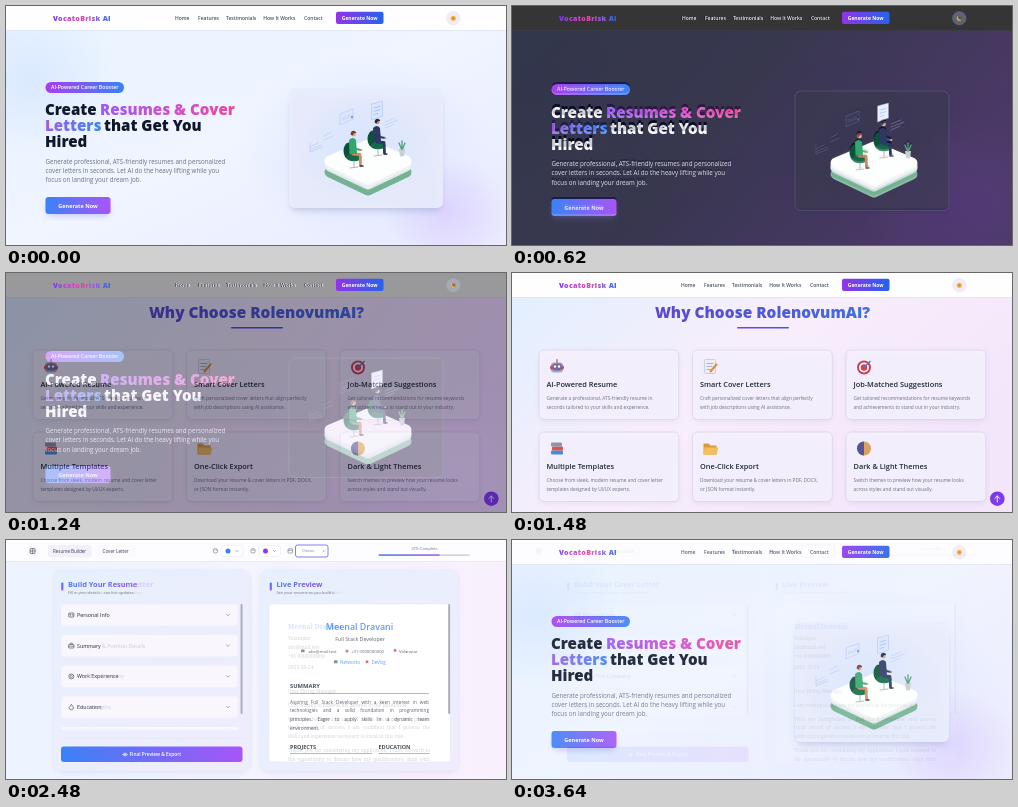
Write an HTML page that moves like this. It is 500x239 px and loops after 3.7 s.

```html
<!DOCTYPE html>
<html lang="en">
<head>
<meta charset="utf-8">
<title>Resume builder tour</title>
<style>
  html, body { margin: 0; width: 100%; height: 100%; overflow: hidden; background: #fff; }
  svg { display: block; width: 100%; height: 100%; }
  text, .just { font-family: 'Open Sans', 'Noto Sans', sans-serif; white-space: pre; }
  .serif { font-family: 'Noto Serif', serif; }
  .just { text-align: justify; text-align-last: justify; white-space: nowrap; line-height: 8.5px; }
</style>
</head>
<body>
<svg id="stage" viewBox="0 0 500 239" preserveAspectRatio="none"></svg>
<script>
const HOLD = 200, STEP = 60, STEPS = 10, SEGMENT = HOLD + STEP * (STEPS - 1);
const BRAND = 'VocatoBrisk AI', PERSON = 'Meenal Dravani', CITY = 'Velanipur',
      EMAIL = 'abc@mail.test', PHONE = '+91 0000000000';

// Drawing helpers
const text = (x, y, size, str, fill, weight = 400, extra = '') =>
  `<text x="${x}" y="${y}" font-size="${size}" fill="${fill}" font-weight="${weight}" ${extra}>${str}</text>`;
const mid = 'text-anchor="middle"';
const rect = (x, y, w, h, r, fill, extra = '') =>
  `<rect x="${x}" y="${y}" width="${w}" height="${h}" rx="${r}" fill="${fill}" ${extra}/>`;
const circle = (x, y, r, fill, extra = '') => `<circle cx="${x}" cy="${y}" r="${r}" fill="${fill}" ${extra}/>`;
const ellipse = (x, y, rx, ry, fill) => `<ellipse cx="${x}" cy="${y}" rx="${rx}" ry="${ry}" fill="${fill}"/>`;
const path = (d, fill, extra = '') => `<path d="${d}" fill="${fill}" ${extra}/>`;
const line = (d, stroke, width = 0.7, extra = '') =>
  path(d, 'none', `stroke="${stroke}" stroke-width="${width}" stroke-linecap="round" stroke-linejoin="round" ${extra}`);
const chevron = (x, y, s = 1.5) => line(`M${x - s} ${y - s / 2}l${s} ${s}l${s} ${-s}`, '#6b7280', 0.6);
const justified = (x, cy, w, size, str, fill, cls = '') =>
  `<foreignObject x="${x}" y="${cy - 4.25}" width="${w}" height="9"><div class="just ${cls}" style="font-size:${size}px;color:${fill}">${str}</div></foreignObject>`;

const linear = (id, colors, x2 = 1, y2 = 0) =>
  `<linearGradient id="${id}" x1="0" y1="0" x2="${x2}" y2="${y2}">${colors.map((c, i) =>
    `<stop offset="${i / (colors.length - 1)}" stop-color="${c}"/>`).join('')}</linearGradient>`;
const glow = (id, color, opacity) =>
  `<radialGradient id="${id}"><stop stop-color="${color}" stop-opacity="${opacity}"/><stop offset=".55" stop-color="${color}" stop-opacity="${opacity * .5}"/><stop offset="1" stop-color="${color}" stop-opacity="0"/></radialGradient>`;

const defs = `<defs>
  ${linear('logo', ['#7c3aed', '#c044d8', '#e0489c', '#8a63e0', '#2563eb'])}
  ${linear('violetBlue', ['#9333ea', '#2563eb'])}
  ${linear('badge', ['#a73ff0', '#3b82f6'])}
  ${linear('blueViolet', ['#3b82f6', '#a855f7'])}
  ${linear('barFill', ['#3b82f6', '#a855f7'], 0, 1)}
  ${linear('title', ['#4f7df3', '#8b4fe6'])}
  ${linear('words1', ['#9a5cf6', '#cf4fd0', '#ec4899'])}
  ${linear('words2', ['#9a5fe0', '#3b86f6'])}
  ${linear('why', ['#5b48d0', '#4f58d8', '#3f70e2'])}
  ${linear('heroLight', ['#e8f3ff', '#f0f5ff', '#e9eaff'], 1, 1)}
  ${linear('heroDark', ['#070a1e', '#0a0823', '#220b40'], 1, .4)}
  ${linear('features', ['#e0efff', '#f8eefb', '#f3e6fb'], 1, .5)}
  ${linear('page', ['#edf4ff', '#f3f4fe', '#faf0fd'])}
  ${linear('panel', ['#e7f0fe', '#efecfd'], 1, 1)}
  ${glow('violetGlow', '#cfbcfd', .5)}${glow('blueGlow', '#cbdfff', .5)}${glow('darkGlow', '#4d2580', .3)}
  <filter id="soft" x="-20%" y="-20%" width="140%" height="150%"><feGaussianBlur stdDeviation="3"/></filter>
  <clipPath id="sheet"><rect x="263" y="64" width="181" height="158"/></clipPath>
</defs>`;

function navBar(dark) {
  const links = [['Home', 169], ['Features', 192], ['Testimonials', 220], ['How It Works', 257.3], ['Contact', 298]];
  const shift = dark ? .9 : 0;
  return rect(0, 0, 500, 24, 0, dark ? '#030305' : '#fefeff') + rect(0, 24, 500, .7, 0, dark ? '#15151d' : '#dbe2ec') +
    text(47, 15, 7.1, BRAND, 'url(#logo)', 800, 'letter-spacing=".3"') +
    links.map(([s, x]) => text(x + shift, 14.3, 5, s, dark ? '#fff' : '#4b5563', 600)).join('') +
    rect(330, 5.7, 47.5, 12.4, 2, 'url(#violetBlue)') + text(353.7, 13.9, 5, 'Generate Now', '#fff', 700, mid) +
    circle(447.3, 12.2, 6.8, dark ? '#3a4356' : '#f1ecf7', `stroke="${dark ? '#4b5568' : '#e4ddec'}" stroke-width=".4"`) +
    (dark ? path('M446.4 9.7a2.6 2.6 0 1 0 3.2 3.7a2.5 2.5 0 0 1-3.2-3.7', '#f0b74a')
          : circle(447.3, 12.3, 2.6, '#f3bd45') + circle(447.3, 12.3, 1.4, '#d98a2b'));
}

const diamond = (dy, fill) =>
  path(`M324 ${155 + dy}L362 ${139 + dy}L400 ${155 + dy}L362 ${173 + dy}Z`, fill, `stroke="${fill}" stroke-width="11" stroke-linejoin="round"`);

function seated(x, y, top, legs, hair) {
  return ellipse(x - 4, y + 17, 5.5, 8.5, '#0c5139') + ellipse(x + 1, y + 23.5, 7.5, 3.8, '#126a48') +
    line(`M${x + 1} ${y + 27}v6m-4 1l8 -1`, '#9aa7a6', .8) +
    line(`M${x} ${y + 20}L${x + 7} ${y + 20.5}L${x + 7.5} ${y + 31}`, legs, 2.8) +
    line(`M${x + 7} ${y + 32}h3`, '#27304a', 1.4) +
    path(`M${x - 4} ${y + 6}q4 -4 7 0l1 14h-7.5z`, top) +
    line(`M${x + 1} ${y + 9}l2 6l5 1`, top, 1.8) + circle(x + 8.3, y + 16, 1.1, '#e9a07a') +
    circle(x + .5, y, 2.4, '#e9a07a') + path(`M${x - 2.3} ${y + .8}q-.3 -4 3 -4q2.4 .3 2.5 2.2q-3 -.4 -3.5 2.4z`, hair);
}

function illustration(dark) {
  const faint = dark ? '#8f98c4' : '#a9bdf2';
  const hologram = path('M334 108l13 -5v10l-13 6z', dark ? '#1d1c40' : '#dce8ff', `stroke="${faint}" stroke-width=".6"`) +
    line('M336.5 112l3 -1.2m2 -.8l3 -1.2m-8 5l7 -2.8M304 141l8 -4m-8 7l11 -5m3 -9l7 -4m-7 8l9 -4M304 137v9l12 -5', faint, .6) +
    circle(346, 111, 1.2, '#5b8def');
  return diamond(11, '#74b292') + diamond(5, '#dfe8ec') + diamond(3, '#edf2f5') + diamond(0, '#fdfefe') +
    `<g opacity="${dark ? .35 : .8}">${hologram}</g>` +
    path('M365.5 98l11 -3v15l-11 4z', dark ? '#f0f4ff' : '#d9e6ff', `stroke="${faint}" stroke-width=".5"`) +
    line('M368 102l6 -1.7m-6 5l6 -1.7m-6 5l4 -1.2', '#8da8e8', .6) +
    line('M379 116l10 -4m-10 7l13 -5m-13 8l9 -4', faint, .6, 'opacity=".75"') +
    seated(371, 116, '#2c3a63', '#2b3a62', '#27293e') + seated(347, 128, '#35a56f', '#d58a63', '#7a3d2c') +
    path('M393 143h6l-1 7q-2 1 -4 0z', '#c7d0d5') +
    line('M396 143v-8m-.5 8l-2.5 -6m3.5 6l2.5 -6', '#4f9e76', 1.3);
}

function hero(dark) {
  const ink = dark ? '#fff' : '#0f172a', soft = dark ? '#e2e4ea' : '#6b7280';
  const copy = ['Generate professional, ATS-friendly resumes and personalized',
    'cover letters in seconds. Let AI do the heavy lifting while you', 'focus on landing your dream job.'];
  const back = rect(0, 0, 500, 239, 0, dark ? 'url(#heroDark)' : 'url(#heroLight)') +
    (dark ? ellipse(455, 200, 110, 90, 'url(#darkGlow)')
          : ellipse(25, 75, 85, 75, 'url(#blueGlow)') + ellipse(360, 145, 130, 100, 'url(#blueGlow)') + ellipse(440, 205, 62, 55, 'url(#violetGlow)'));
  const card = dark
    ? rect(283, 83, 154, 119.5, 6, '#0f0e24', 'fill-opacity=".6" stroke="#3f3d5c" stroke-width=".6"')
    : rect(285, 90, 150, 115, 6, '#8a93ba', 'opacity=".4" filter="url(#soft)"') + rect(283, 82, 154, 120, 6, '#e9edfd', 'fill-opacity=".93"') +
      ellipse(358, 140, 70, 55, 'url(#blueGlow)');
  const words = text(39, 109, 15.1, 'Create', ink, 800) + text(94, 109, 15.1, 'Resumes &amp; Cover', 'url(#words1)', 800) +
    text(39, 125, 15.1, 'Letters', 'url(#words2)', 800) + text(98, 125, 15.1, 'that Get You', ink, 800) +
    text(39, 141, 15.1, 'Hired', ink, 800) +
    copy.map((s, i) => text(39.5, 157.7 + 9.1 * i, 6.22, s, soft, dark ? 500 : 400)).join('');
  return back + `<g transform="translate(0 ${dark ? 2 : 0})">` +
    rect(39.5, 76, 78.5, 11, 5.5, 'url(#badge)') + text(78.7, 83.4, 5.2, 'AI-Powered Career Booster', '#fff', 600, mid) +
    `<g transform="translate(0 ${dark ? .7 : 0})">${words}</g>` +
    rect(41, 195, 62, 15, 4, '#7b6fe0', 'opacity=".35" filter="url(#soft)"') +
    rect(39.5, 191, 65, 17, 3, 'url(#blueViolet)') + text(72, 201.6, 5.5, 'Generate Now', '#fff', 700, mid) +
    card + illustration(dark) + '</g>' + navBar(dark);
}

const featureIcons = [
  (x, y) => rect(x - 6, y - 4, 12, 10, 3, '#a9a6c4') + rect(x - 7, y - 1, 14, 4, 1.5, '#d9485f') + rect(x - 4.5, y - 3, 9, 7, 2, '#6b6ca2') +
    circle(x - 2, y, 1.2, '#fff') + circle(x + 2, y, 1.2, '#fff') + line(`M${x} ${y - 4}v-3`, '#d9485f', 1.2),
  (x, y) => rect(x - 6, y - 7, 11, 14, 1, '#eceef4', 'stroke="#b7bccb" stroke-width=".6"') +
    line(`M${x - 3.5} ${y - 3}h6m-6 3h5m-5 3h4`, '#8d97ad', .7) + line(`M${x + 6} ${y - 2}l-6 7`, '#e38b3c', 2),
  (x, y) => circle(x, y + 1, 7, '#d53d54') + circle(x, y + 1, 5, '#fff') + circle(x, y + 1, 3.2, '#d53d54') + line(`M${x} ${y + 1}l6 -6`, '#3f7fd1', 1.5),
  (x, y) => rect(x - 6, y + 2, 12, 4, 1, '#3f8fd8') + rect(x - 5, y - 2, 11, 4, 1, '#d9534f') + rect(x - 6, y - 6, 11, 4, 1, '#8f93a8'),
  (x, y) => path(`M${x - 7} ${y - 5}h5l2 2h6v9h-13z`, '#d99a3a') + path(`M${x - 6} ${y - 1}h14l-2 7h-13z`, '#f3c057'),
  (x, y) => circle(x, y, 7, '#d9a062') + path(`M${x} ${y - 7}a7 7 0 0 0 0 14z`, '#55549a')
];
const features = [
  ['AI-Powered Resume', 'Generate a professional, ATS-friendly resume in', 'seconds tailored to your skills and experience.'],
  ['Smart Cover Letters', 'Craft personalized cover letters that align perfectly', 'with job descriptions using AI assistance.'],
  ['Job-Matched Suggestions', 'Get tailored recommendations for resume keywords', 'and achievements to stand out in your industry.'],
  ['Multiple Templates', 'Choose from sleek, modern resume and cover letter', 'templates designed by UI/UX experts.'],
  ['One-Click Export', 'Download your resume &amp; cover letters in PDF, DOCX,', 'or JSON format instantly.'],
  ['Dark &amp; Light Themes', 'Switch themes to preview how your resume looks', 'across styles and stand out visually.']
];

function featurePage() {
  const cards = features.map(([head, a, b], i) => {
    const x = 27 + 153.5 * (i % 3), y = i < 3 ? 77 : 159;
    return rect(x + 1, y + 3, 138, 68, 5, '#9c94bb', 'opacity=".2" filter="url(#soft)"') +
      rect(x, y, 139.8, 69.5, 5, '#f5f1fd', 'fill-opacity=".9" stroke="#d5cfe6" stroke-width=".6"') + featureIcons[i](x + 18, y + 16.5) +
      text(x + 7.5, y + 37.3, 7.35, head, '#1f2937', 600) +
      text(x + 7.5, y + 50, 4.8, a, '#6b7280') + text(x + 7.5, y + 59.4, 4.8, b, '#6b7280');
  }).join('');
  return rect(0, 0, 500, 239, 0, 'url(#features)') + navBar(false) +
    text(250.5, 45, 15.4, 'Why Choose RolenovumAI?', 'url(#why)', 800, mid) +
    rect(225, 54, 52, 1.5, .7, 'url(#violetBlue)') + cards +
    circle(485.3, 225.7, 7.3, '#7c3aed') + line('M485.3 229v-6m-2.5 2.5l2.5 -2.5l2.5 2.5', '#fff', .9);
}

function toolBar(active, percent) {
  const palette = x => circle(x, 10.8, 2.3, 'none', 'stroke="#6b7280" stroke-width=".6"') + circle(x - .7, 10, .5, '#6b7280') + circle(x + .8, 10.2, .5, '#6b7280');
  const swatch = (x, color) => rect(x, 5.5, 22, 11, 3, '#fff', 'stroke="#e3e5ee" stroke-width=".5"') + circle(x + 7, 11, 2.5, color) + chevron(x + 16, 11, 1.2);
  return rect(0, 0, 500, 21, 0, '#fdfdff') + rect(0, 21, 500, .6, 0, '#e3e7f0') +
    rect(21.5, 5.5, 10.5, 11, 2, '#f7f7fb') + rect(24.2, 8.6, 4.8, 4.8, .6, 'none', 'stroke="#4b5563" stroke-width=".7"') +
    line('M26.6 8.6v4.8m-2.4 -2.4h4.8', '#4b5563', .6) +
    (active ? rect(91, 5, 39, 12.5, 3, '#f1edfa') : rect(42, 5, 43.5, 12.5, 3, '#f1edfa')) +
    text(47, 12.6, 4.5, 'Resume Builder', '#374151', 500) + text(96.5, 12.6, 4.6, 'Cover Letter', '#374151', 500) +
    palette(209.5) + swatch(215, '#3b82f6') + palette(247) + swatch(252.5, '#9333ea') +
    rect(282, 8.8, 4.6, 4.2, .6, 'none', 'stroke="#6b7280" stroke-width=".6"') + rect(282, 9.9, 4.6, .6, 0, '#6b7280') +
    rect(289.5, 5, 32.5, 12, 2, '#fff', 'stroke="#7470e8" stroke-width=".9"') + text(296, 12.3, 4, 'Classic', '#6f86a8') + chevron(318, 11, 1.1) +
    text(418.5, 10.3, 3.9, `${percent}% Complete`, '#6b7280', 400, mid) +
    rect(372.5, 14.2, 91.5, 1.7, .8, '#d4d6df') + (percent ? rect(372.5, 14.2, .915 * percent, 1.7, .8, 'url(#blueViolet)') : '');
}

const sectionIcons = [
  (x, y) => rect(x - 2.6, y - 2, 5.2, 4, .5, 'none', 'stroke="#4b5563" stroke-width=".7"') + circle(x - 1, y - .3, .7, '#4b5563') + line(`M${x + .8} ${y - .6}h1m-1 1.2h1`, '#4b5563', .5),
  (x, y) => rect(x - 2.6, y - 1.3, 5.2, 3.6, .5, 'none', 'stroke="#4b5563" stroke-width=".7"') + line(`M${x - 1} ${y - 1.5}v-1h2v1m-3.5 2h5`, '#4b5563', .6),
  (x, y) => circle(x, y, 2.5, 'none', 'stroke="#4b5563" stroke-width=".7"') + circle(x, y, 1.1, 'none', 'stroke="#4b5563" stroke-width=".6"'),
  (x, y) => path(`M${x} ${y - 2.8}q3 3 2 4.5q-2 2 -4 0q-.6 -1.5 .6 -2.5q1 0 1.4 -2z`, 'none', 'stroke="#4b5563" stroke-width=".7"')
];

function builder(active, percent, title, hint, previewHint, sections, sheet) {
  const panel = (x, w) => rect(x + 2, 33, w - 4, 199, 8, '#a49cd0', 'opacity=".25" filter="url(#soft)"') +
    rect(x, 30, w, 201, 8, 'url(#panel)', 'stroke="#e0e6f6" stroke-width=".5"');
  const heading = (x, s, sub) => rect(x, 42.5, 2.2, 8, 1, 'url(#barFill)') +
    text(x + 6.7, 46.8, 7.4, s, 'url(#title)', 700) + text(x + 6.7, 53.5, 4, sub, '#6b7280');
  const rows = sections.map((s, i) => {
    const y = 64 + 30.7 * i;
    return rect(55, y, 177, 22, 3, '#f9f6fe', 'stroke="#efeaf8" stroke-width=".5"') + sectionIcons[i](65.3, y + 11) +
      text(71, y + 12.9, 5.3, s, '#1f2937', 500) + chevron(222, y + 11);
  }).join('');
  return rect(0, 0, 500, 239, 0, 'url(#page)') + toolBar(active, percent) + panel(47, 197.5) + panel(254, 199) +
    heading(55.2, title, hint) + heading(263.7, 'Live Preview', previewHint) + rows +
    rect(55, 187, 177, 3, 1.5, '#f9f6fe') + rect(234.6, 64, 1.9, 110, .9, '#a9acb8') +
    rect(55, 198, 182, .5, 0, '#dfe3f0') + rect(55, 206.5, 181.5, 15.5, 3, 'url(#blueViolet)') +
    path('M116.5 214.5q2.5 -3 5 0q-2.5 3 -5 0z', 'none', 'stroke="#fff" stroke-width=".7"') + circle(119, 214.5, .8, '#fff') +
    text(123.5, 216.2, 4.8, 'Final Preview &amp; Export', '#fff', 600) +
    rect(263, 64, 181.5, 158, 3, '#fff', 'stroke="#e2e4ee" stroke-width=".5"') +
    rect(442.2, 64, 1.9, 110, .9, '#a9acb8') + `<g clip-path="url(#sheet)">${sheet}</g>`;
}

function resumeSheet() {
  const summary = ['Aspiring Full Stack Developer with a keen interest in web',
    'technologies and a solid foundation in programming', 'principles. Eager to apply skills in a dynamic team'];
  const ink = '#374151', rule = (x, y, w) => rect(x, y, w, .7, 0, '#6d78d8');
  return text(353.5, 90, 8.9, PERSON, '#3b82f6', 600, mid) + text(354, 101, 5.3, 'Full Stack Developer', ink, 400, mid) +
    rect(295, 109.5, 3.6, 2.8, .4, '#6b7280') + text(302.5, 112.6, 4.3, EMAIL, ink) +
    circle(341, 111, 1.5, '#c05a78') + text(345, 112.6, 4.3, PHONE, ink) +
    circle(389, 110.5, 1.4, '#d9485f') + text(393, 112.6, 4.3, CITY, ink) +
    rect(328, 120.3, 3.5, 3, .4, '#6b7280') + text(334, 123.5, 4.5, 'Networks', '#3b82f6') +
    circle(361, 121.8, 1.5, '#d9485f') + text(365.5, 123.5, 4.5, 'Devlog', '#3b82f6') +
    text(284, 148, 5.8, 'SUMMARY', '#1f2937', 700) + rule(284, 153.2, 139) +
    summary.map((s, i) => justified(284, 162 + 8.6 * i, 139, 4.7, s, ink)).join('') + text(284, 189.5, 4.7, 'environment.', ink) +
    text(284, 208.8, 5.5, 'PROJECTS', '#1f2937', 700) + text(372.5, 208.8, 5.5, 'EDUCATION', '#1f2937', 700) +
    rule(284, 213.2, 82) + rule(372.5, 213.2, 51);
}

function letterSheet() {
  const ink = '#30343c', serif = 'class="serif"';
  const put = (y, s, size = 4.75) => text(282, y, size, s, ink, 400, serif);
  const body = [[179, 'With my background in Full Stack Developer and proven'],
    [187.6, 'track record of success, I am confident that I possess the'],
    [210.3, 'Thank you for considering my application. I look forward to'],
    [218.8, 'the opportunity to discuss how my qualifications align with']];
  return text(282, 89.2, 6.7, PERSON, '#3b82f6', 700, serif) +
    put(99.5, CITY) + put(108.7, EMAIL) + put(117.7, PHONE, 4.9) + put(128.6, '2025-10-24', 5) +
    put(152.5, 'Dear Hiring Manager,') + put(167.4, 'I am writing to express my interest in the position at .') +
    body.map(([y, s]) => justified(282, y, 142, 4.75, s, ink, 'serif')).join('') +
    put(197.8, 'skills and experience necessary to excel in this role.');
}

const scenes = [
  hero(false),
  hero(true),
  featurePage(),
  builder(0, 67, 'Build Your Resume', 'Fill in your details - see live updates', 'See your resume as you build it',
    ['Personal Info', 'Summary', 'Work Experience', 'Education'], resumeSheet()),
  builder(1, 0, 'Build Your Cover Letter', 'Fill in the details for your target position', 'See your cover letter as you build it',
    ['Personal Info', 'Company &amp; Position Details', 'Why This Company', 'Key Strengths'], letterSheet())
];

const stage = document.getElementById('stage');
stage.innerHTML = defs + scenes.map(s => `<g class="scene">${s}</g>`).join('');
const layers = [...stage.querySelectorAll('.scene')];

function render(now) {
  const t = now % (SEGMENT * layers.length), current = Math.floor(t / SEGMENT), u = t - current * SEGMENT;
  const mix = u < HOLD ? 0 : (Math.floor((u - HOLD) / STEP) + 1) / STEPS;
  const next = (current + 1) % layers.length;
  layers.forEach((layer, i) => {
    // The last layer fades away over the first; all others fade in on top.
    const alpha = i === current ? (next === 0 ? 1 - mix : 1) : i === next ? (next === 0 ? 1 : mix) : 0;
    layer.style.display = alpha ? '' : 'none';
    layer.style.opacity = alpha;
  });
}

const start = performance.now();
function tick() {
  render(performance.now() - start);
  requestAnimationFrame(tick);
}
tick();
</script>
</body>
</html>
```
